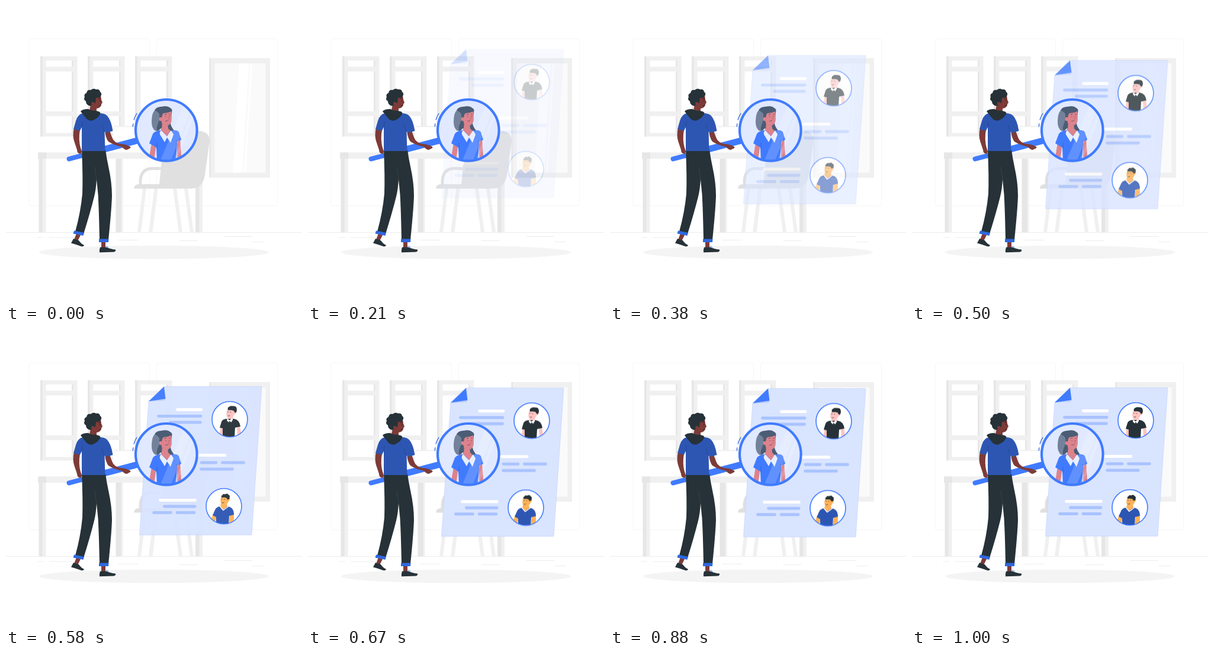
These frames come from a looping animation (500 px wide and 500 px high, 1.04 s). An HTML page:

```html
<!DOCTYPE html>
<html lang="en">
<head>
<meta charset="utf-8">
<title>Searching a candidate profile</title>
<style>
  html, body { margin: 0; width: 100%; height: 100%; overflow: hidden; background: #fff; }
  svg { display: block; width: 100vw; height: 100vh; }

  .pale { fill: #f0f0f0; }
  .grey { fill: #e6e6e6; }
  .seat { fill: #e0e0e0; }
  .white { fill: #fff; }
  .dark { fill: #263238; }
  .blue { fill: #407bff; }
  .navy { fill: #2d56b3; }
  .skin { fill: #7d3b38; }
  .rose { fill: #dc838d; }
  .pink { fill: #ffc3c0; }
  .amber { fill: #ffb257; }
  .slate { fill: #4b5d74; }
  .line { fill: none; stroke-linecap: round; stroke-linejoin: round; }
  .bars { stroke-width: 4.8; }

  /* 25 poses per loop, 4% each */
  .page { animation: drop 1040ms -4ms infinite both; }
  @keyframes drop {
    0%   { opacity: 0;   transform: translateY(-30px);   animation-timing-function: steps(1); }
    12%  { opacity: .05; transform: translateY(-30px);   animation-timing-function: steps(2); }
    20%  { opacity: .23; transform: translateY(-24.3px); animation-timing-function: steps(4); }
    36%  { opacity: .57; transform: translateY(-13.9px); animation-timing-function: steps(3); }
    48%  { opacity: .81; transform: translateY(-5.6px);  animation-timing-function: steps(2); }
    56%  { opacity: .96; transform: translateY(-2px);    animation-timing-function: steps(1); }
    60%  { opacity: 1;   transform: translateY(-.3px);   animation-timing-function: steps(3); }
    72%  { opacity: 1;   transform: translateY(1.7px);   animation-timing-function: steps(2); }
    80%  { opacity: 1;   transform: translateY(1.7px);   animation-timing-function: steps(4); }
    96%  { opacity: 1;   transform: translateY(0);       animation-timing-function: steps(1); }
    100% { opacity: 1;   transform: translateY(0); }
  }
</style>
</head>
<body>
<svg viewBox="0 0 500 500">
  <defs>
    <clipPath id="lensClip"><circle cx="270.8" cy="209.8" r="51"/></clipPath>
    <clipPath id="topClip"><circle cx="378" cy="152.8" r="30"/></clipPath>
    <clipPath id="lowClip"><circle cx="368" cy="299.8" r="30"/></clipPath>
    <g id="window">
      <path class="pale" d="M58 85h62.500v135.500H58z"/>
      <path class="grey" d="M58 85h3.500v135.500H58z"/>
      <path class="white" d="M67.500 92H113v10.500H67.500zM67.500 110.500H113V178H67.500zM67.500 186H113v28.500H67.500z"/>
      <path class="grey" d="M111 92h2.500v10.500H111zM111 110.500h2.500V178H111zM111 186h2.500v28.500H111z"/>
    </g>
  </defs>

  <!-- room -->
  <g class="line" stroke="#f6f6f6">
    <rect x="39" y="55.500" width="203.500" height="282" rx="3"/>
    <rect x="254.500" y="55.500" width="204" height="282" rx="3"/>
    <path stroke="#ededed" d="M0 382.500H500M53 391h10M73 391h51M190 395.500h33M293 396.500h30M369 389.500h47M417 398.500h18"/>
  </g>
  <ellipse cx="250" cy="416" rx="194" ry="11.300" fill="#f4f4f4"/>
  <use href="#window"/>
  <use href="#window" x="80"/>
  <use href="#window" x="160"/>
  <path class="white" d="M181 203h100v44H181z"/>
  <path class="pale" d="M181 202.500h40v2h-40z"/>

  <!-- mirror -->
  <path class="pale" d="M343.500 88H446v202H343.500z"/>
  <path class="grey" d="M343.500 88h2.500v202h-2.500z"/>
  <path fill="#fafafa" d="M352.500 97H438.500v184.500h-86z"/>
  <path class="white" d="M394 97h16l-11 184.500h-16zM413 97h3l-11 184.500h-3z"/>

  <!-- desk -->
  <path class="pale" d="M54 247.500h278V258H54zM61 258h6.500v124.500H61zM191 258h6.500v124.500H191zM326 258h6v124.500h-6z"/>
  <path class="grey" d="M54 247.500h14V258H54zM55.500 258h6v124.500h-6zM185.500 258h9v124.500h-9zM320 258h6.500v124.500H320z"/>

  <!-- chair -->
  <path class="pale" d="M231 308h6l-9 74.500h-6zM250.500 308h6l-9 74.500h-6.500zM282 308h6l10 74.500h-6zM301 308h6l10 74.500h-6z"/>
  <path class="seat" d="M286 211h39q21 1 18.500 20l-7.500 54q-3 23-24 23.500h-96q0-7 8-7.500h35l6-60z"/>
  <path class="line" stroke="#e0e0e0" stroke-width="4.800" d="M227 304V294q2-19 19-19.500H267"/>

  <g class="page">
    <path fill="#d9e4ff" stroke="#bccfff" stroke-width=".6" d="M267 97.500H432L415 348.200H225.500L241 122.500z"/>
    <path fill="#c0d1fa" d="M241 122.500l28.500-4-1.500 3z"/>
    <path class="blue" d="M267 97.500l2.500 20.800-28.500 4.200z"/>
    <g class="line bars">
      <path stroke="#fff" d="M289.500 136.500h40.500M320 213.500h50M260.500 289.500h59"/>
      <path stroke="#a9c3ff" d="M257.500 147.500H329M277.500 158h51M330 226h25M365.500 226h36M329.500 237h53M267.500 300H319M249.500 310.500h29M289 310.500h29"/>
    </g>

    <circle class="white" cx="378" cy="152.800" r="30"/>
    <g clip-path="url(#topClip)">
      <path class="pink" d="M363 163l-3 20h6l2-18zM390 163l1 20h7l-3-20zM375 145h8l1 10-7 4-4-4z"/>
      <path class="dark" d="M374 152q-8 0-10 5l-3 10 5 1v16h20l1-17 9-2q-2-12-11-13z"/>
      <path class="white" d="M374 151l-1 4 3.500 3 1-2.500 3 2.500 3-5-2-2-4 3.500z"/>
      <path class="pink" d="M373.500 137q-2 6-.8 10 1.500 4 5.300 3.500 6-.5 8-6.500v-8z"/>
      <path class="dark" d="M375 137.500q-1.500-4.500 2-6 3-2 6.500-1 5.500-.5 6 3.500 1.500 4-1.500 8.500h-2l-1-4q-4.500-2-10-1z"/>
      <circle class="pink" cx="386" cy="142.500" r="1.800"/>
      <path class="line" stroke="#263238" stroke-width=".8" d="M374.500 140.500h.8M379 141h.8M375 147q1.500.8 3-.5"/>
    </g>
    <circle class="line" cx="378" cy="152.800" r="30" stroke="#407bff" stroke-width="1.600"/>

    <circle class="white" cx="368" cy="299.800" r="30"/>
    <g clip-path="url(#lowClip)">
      <path class="amber" d="M350 313l-6 13 9 4 3-14zM378 313l-2 18 9-2V313zM364 291h8l2 9-7 7-5-7z"/>
      <path class="navy" d="M361 300q-6 1-8 6l-4 9 6 3v13h21l1-15 8-2q0-13-11-14l-8 6z"/>
      <path class="line" stroke="#fff" stroke-width="1.300" d="M361.500 300l5.500 6.500 8-6"/>
      <path class="amber" d="M363.500 284q-2 6-.8 10 1.500 4 5.300 3.500 6-.5 8-6.500v-8z"/>
      <path class="dark" d="M364.500 285q-2-3 1-4 1-3 4.500-1.500 4-2 5.500.5 3.500 1.500 2.200 5 .3 4-2.200 5h-1.500l-1-4q-4-2-8.500-1z"/>
      <circle class="amber" cx="375.500" cy="289.500" r="1.800"/>
      <path class="line" stroke="#263238" stroke-width=".8" d="M364.500 287.500h.8M369 288h.8M365 294q1.500.8 3-.5"/>
    </g>
    <circle class="line" cx="368" cy="299.800" r="30" stroke="#407bff" stroke-width="1.600"/>
  </g>

  <!-- magnifier -->
  <path class="line" stroke="#2f63d6" stroke-width="1.300" d="M221 181.500q-3.500 5-4.800 10.500M214.800 199l-.5 4.500"/>
  <g class="line" stroke="#407bff">
    <path stroke-width="8" d="M106.500 258.300L172 241"/>
    <path stroke-width="11" stroke-linecap="butt" d="M166 242L222 227.200"/>
  </g>
  <circle cx="270.800" cy="209.800" r="51.800" fill="#e0e9ff"/>
  <g clip-path="url(#lensClip)">
    <path fill="#73829a" d="M262 171q-14 2-15.500 17-2 15 3.500 21 4 4 9 1l6-27z"/>
    <path class="slate" d="M251 176q3-6 12-6 10-2 14 2 5 2 3 8l-2 19q2 8 8 13-8 2-13-4l-12-1q-3 4-6 3-1-5 2-12l4-12q-4-8-10-10z"/>
    <path class="rose" d="M247 225l-5 30 8 6 4-27zM288 222l1 34 7-2-2-32zM264 198h9l1 9 4 4-6 13-12-12 3-6z"/>
    <path class="blue" d="M261 210q-10 1-13 6l-6 16 12 7 1 24h32l2-34 7-3-4-13q-3-4-11-3l-8 9z"/>
    <path fill="#e6eeff" d="M262 210q-3 3-2 7l8 13 4-8 6 9 5-14-4-7-7 10z"/>
    <path class="rose" d="M263.500 210l8.500 10 5-9-4-4-8.500-1z"/>
    <path class="rose" d="M262 181q-1 12 2 19 5 4 11 1 5-3 5-11l-1-12q-8 4-15 2z"/>
    <path class="slate" d="M260 175q10 2 19 3l-8 2q-6 0-7 4l-2 10q-4-2-3-8z"/>
    <ellipse class="rose" cx="261" cy="191" rx="2.300" ry="3.200"/>
    <path class="line" stroke="#4b4d66" stroke-width=".8" d="M268 183.500l3-1M275.500 182.500l2 .5M270 186.500v.8M276.500 186v.8M269.500 194.500q2.500.5 4.500-1.500"/>
    <path class="line" stroke="#bd6674" stroke-width=".8" d="M274 186l1.800 4.500-2 .5"/>
    <path class="line" stroke="#2f5ed0" stroke-width=".8" d="M255 231v10M288 227v9"/>
    <path class="white" opacity=".17" d="M303 160l11 11-36 92h-18zM316 174l4 5-33 84h-5z"/>
  </g>
  <circle class="line" cx="270.800" cy="209.800" r="51.800" stroke="#407bff" stroke-width="4.200"/>

  <!-- man -->
  <path class="skin" d="M119 384l7 3-5 10-6-2zM161 398h7v11h-7z"/>
  <path class="dark" d="M114 393l9 3q3 5 9 8-1 3-5 2-8-3-17-5.500zM159 407.500h11q6 3 15 4 1 3-3 4l-24 .8q-.5-5 1-8.800z"/>
  <path class="line" stroke="#407bff" stroke-width=".8" d="M168 407.500l3-2 2 3"/>
  <path class="dark" d="M128 243h40q2 14 5 28 6 27 6 50-1 26-6 74h-15q-1-51-2.500-77l-2.500-25q-1 17-4 29-7 28-18 63l-14-4q9-32 12-64 1-30-1-74z"/>
  <path class="line" stroke="#3d4a50" stroke-width=".7" d="M153 293l-3-21"/>
  <path fill="#2e68df" d="M115 379.500l17 3.500-1.500 5-17-3.500zM157 393.500h16.500l-.5 5.500h-16z"/>
  <path class="skin" d="M115 206q-3 12 0 22l5 15q0 5 4 6.500 4 1 4-4l-2-6q-4-13-1-31zM167 209q1 14 6 20 9 6 23 9 4 5 8 5l6-3 .5-2q-7-4-12-4.500-11 0-17-7-3-5-6-15z"/>
  <path class="navy" d="M130 181q-9 2-12 13l-4 14 11 3 3-7v41h39.500l-1-33 4 2 10-3q-3-19-10-26-4-4-14-4z"/>
  <path class="line" stroke="#24468f" stroke-width=".8" d="M128 206l1-10M166 213l-4-13"/>
  <path class="skin" d="M144 162l-3 14q6 6 12 1v-5z"/>
  <path class="skin" d="M149 153q-5 10-4 15 4 6 9 5 6-1 7-7l2-3-2-5-1-8z"/>
  <path class="dark" d="M126 178q3-4 13-4 4 3 13 3 7 1 7.500 4-2 7-12 12-6 2-11-2-5-6-10.500-13z"/>
  <path class="dark" d="M142 169q-7-2-7-8-5-3-2-7-2-5 3-7 1-6 7-5 5-4 9-1 6-1 7 4 4 3 1 7-2 4-8 3l-1 9-4-1-1 4z"/>
  <ellipse class="skin" cx="146.500" cy="165" rx="2.400" ry="3"/>
  <path class="line" stroke="#1d1a1f" stroke-width=".9" d="M156.500 156.500l3-.5M158.500 159.500v1M157.500 168.500l3-1"/>
</svg>
</body>
</html>
```
